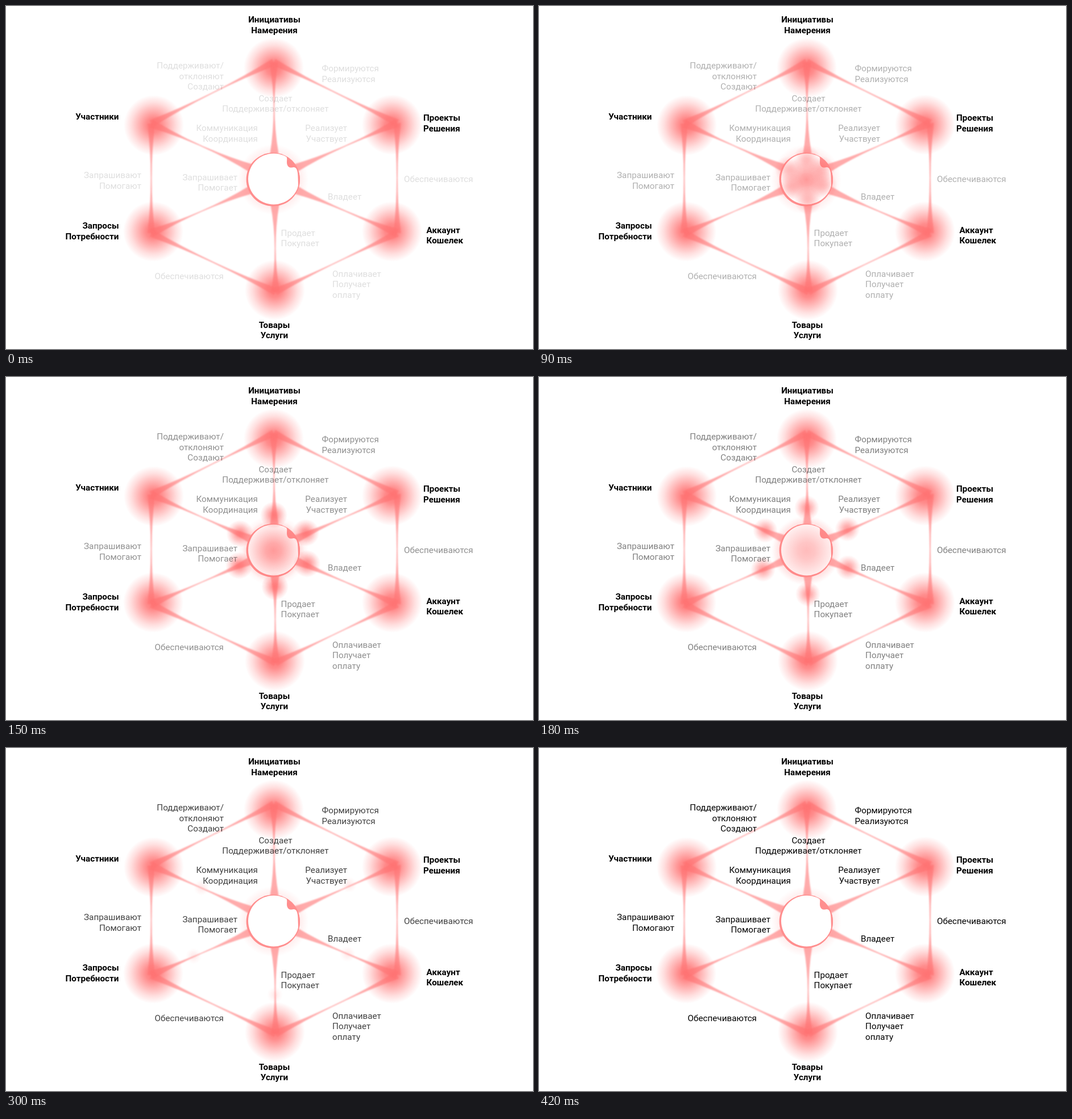
An HTML page that plays this animation: 927x604 px, repeating every 4.95 s.

```html
<!DOCTYPE html>
<html lang="ru">
<head>
<meta charset="utf-8">
<title>Схема связей</title>
<style>
  html, body { margin: 0; width: 100%; height: 100%; overflow: hidden; background: #fff; }
  svg { display: block; }
  text { font: 15.25px Roboto, sans-serif; fill: #000; }
  .title { font-weight: 700; }
  .note, .core, .spark, .move { animation: 4950ms infinite; }

  /* one step lasts 30 ms = 0.60606 % of the loop */
  .note { animation-name: appear; }
  @keyframes appear {
    0% { opacity: .13; animation-timing-function: steps(14); }
    8.4848%, 100% { opacity: 1; }
  }
  .core { animation-name: pulse; }
  @keyframes pulse {
    0% { opacity: 0; r: 20px; animation-timing-function: steps(4); }
    2.4242% { opacity: 1; r: 50px; animation-timing-function: steps(4); }
    4.8484%, 100% { opacity: 0; r: 70px; }
  }
  .spark { animation-name: fade; }
  @keyframes fade {
    0% { opacity: 0; r: 22px; animation-timing-function: step-end; }
    1.8181% { opacity: .45; r: 24px; animation-timing-function: step-end; }
    2.4242% { opacity: 1; r: 26px; animation-timing-function: steps(7); }
    6.6666%, 100% { opacity: 0; r: 12px; }
  }
  .move { animation-name: fly; }
  @keyframes fly {
    0% { transform: translate(var(--x0), var(--y0)); animation-timing-function: steps(14); }
    8.4848%, 100% { transform: translate(var(--x1), var(--y1)); }
  }
</style>
</head>
<body>
<svg width="927" height="604" viewBox="0 0 927 604">
  <defs>
    <radialGradient id="glow">
      <stop offset="0" stop-color="#ff6c6c" stop-opacity=".92"/>
      <stop offset=".25" stop-color="#ff6c6c" stop-opacity=".78"/>
      <stop offset=".5" stop-color="#ff6c6c" stop-opacity=".5"/>
      <stop offset=".75" stop-color="#ff6c6c" stop-opacity=".22"/>
      <stop offset="1" stop-color="#ff6c6c" stop-opacity="0"/>
    </radialGradient>
    <radialGradient id="halo">
      <stop offset=".7" stop-color="#ff6c6c" stop-opacity=".14"/>
      <stop offset="1" stop-color="#ff6c6c" stop-opacity="0"/>
    </radialGradient>
    <filter id="soft" filterUnits="userSpaceOnUse" x="0" y="0" width="927" height="604">
      <feGaussianBlur stdDeviation="1.1"/>
    </filter>
  </defs>
  <g id="nodes" fill="url(#glow)"></g>
  <circle cx="470" cy="305.5" r="62" fill="url(#halo)"/>
  <g id="links" fill="#ff7474" fill-opacity=".6" filter="url(#soft)"></g>
  <g fill="#ff8e8e">
    <circle cx="469.8" cy="305.5" r="47.2"/>
    <circle cx="470.9" cy="304.6" r="44.9" fill="#fff"/>
    <path d="M489 262.5C496 265 494 270 494 275C494 283 499 286 505 284C511 283 513.6 290 513.6 303Q514 314 514.2 321.6A47 47 0 0 0 489 262.5Z"/>
  </g>
  <circle class="core" cx="470.5" cy="306" r="20" fill="url(#glow)"/>
  <g id="sparks" fill="url(#glow)"></g>
  <g id="labels"></g>
</svg>
<script>
  const add = (parent, tag, attrs) => {
    const el = document.createElementNS('http://www.w3.org/2000/svg', tag);
    for (const key in attrs) el.setAttribute(key, attrs[key]);
    return parent.appendChild(el);
  };
  const [nodes, links, sparks, labels] =
    ['nodes', 'links', 'sparks', 'labels'].map(id => document.getElementById(id));

  // glow centre, tip of the links, spoke end at the ring
  const hubs = [
    [[471, 109], [471, 99], [472, 260]],
    [[679, 209], [688, 206], [508, 286]],
    [[679, 397], [688, 400], [508, 323]],
    [[473, 500], [474, 503], [473, 350]],
    [[259, 397], [255.5, 400], [432, 323]],
    [[260, 210], [255.5, 207], [432, 286]]
  ];

  // a band with wide ends and a thin waist
  const link = ([ax, ay], [bx, by], w) => {
    const len = Math.hypot(bx - ax, by - ay);
    const nx = (ay - by) / len, ny = (bx - ax) / len;
    const mx = (ax + bx) / 2, my = (ay + by) / 2;
    const c = 1.8 - w;
    const at = (x, y, d) => `${x + nx * d} ${y + ny * d}`;
    add(links, 'path', {
      d: `M${at(ax, ay, w)}Q${at(mx, my, c)} ${at(bx, by, w)}` +
         `L${at(bx, by, -w)}Q${at(mx, my, -c)} ${at(ax, ay, -w)}Z`
    });
  };

  hubs.forEach(([[cx, cy], tip, ringEnd], i) => {
    add(nodes, 'circle', { cx, cy, r: 53 });
    link(tip, hubs[(i + 1) % 6][1], 6.5);
    link(tip, ringEnd, 7.5);
  });

  // place at the ring and shift per step
  [
    [471, 256, 0, -12.9], [512, 281, 15.2, -6.7], [515, 322, 14.3, 6.8],
    [473, 356, 0, 13.1], [426, 325, -16, 6.9], [425, 282, -13.5, -6]
  ].forEach(([x, y, vx, vy]) => {
    const move = add(sparks, 'g', {
      class: 'move',
      style: `--x0:${x - 4 * vx}px;--y0:${y - 4 * vy}px;--x1:${x + 10 * vx}px;--y1:${y + 10 * vy}px`
    });
    add(move, 'circle', { class: 'spark', r: 22 });
  });

  const label = (kind, anchor, x, y, lines) => lines.split('|').forEach((line, i) => {
    add(labels, 'text', { class: kind, 'text-anchor': anchor, x, y: y + i * 18.4 }).textContent = line;
  });

  label('title', 'middle', 472, 29.3, 'Инициативы|Намерения');
  label('title', 'start', 734, 202.2, 'Проекты|Решения');
  label('title', 'start', 739.5, 399.8, 'Аккаунт|Кошелек');
  label('title', 'middle', 472, 566.6, 'Товары|Услуги');
  label('title', 'end', 198.5, 392.2, 'Запросы|Потребности');
  label('title', 'end', 198.5, 200.2, 'Участники');

  label('note', 'end', 383, 110.3, 'Поддерживают/|отклоняют|Создают');
  label('note', 'start', 555.5, 115.3, 'Формируются|Реализуются');
  label('note', 'middle', 474, 168, 'Создает|Поддерживает/отклоняет');
  label('note', 'end', 443, 220.3, 'Коммуникация|Координация');
  label('note', 'end', 600, 220.3, 'Реализует|Участвует');
  label('note', 'end', 238, 303.3, 'Запрашивают|Помогают');
  label('note', 'end', 407, 307, 'Запрашивает|Помогает');
  label('note', 'start', 700, 309.6, 'Обеспечиваются');
  label('note', 'start', 566, 341, 'Владеет');
  label('note', 'start', 483.5, 404.6, 'Продает|Покупает');
  label('note', 'end', 383, 481, 'Обеспечиваются');
  label('note', 'start', 574, 477, 'Оплачивает|Получает|оплату');
</script>
</body>
</html>
```
